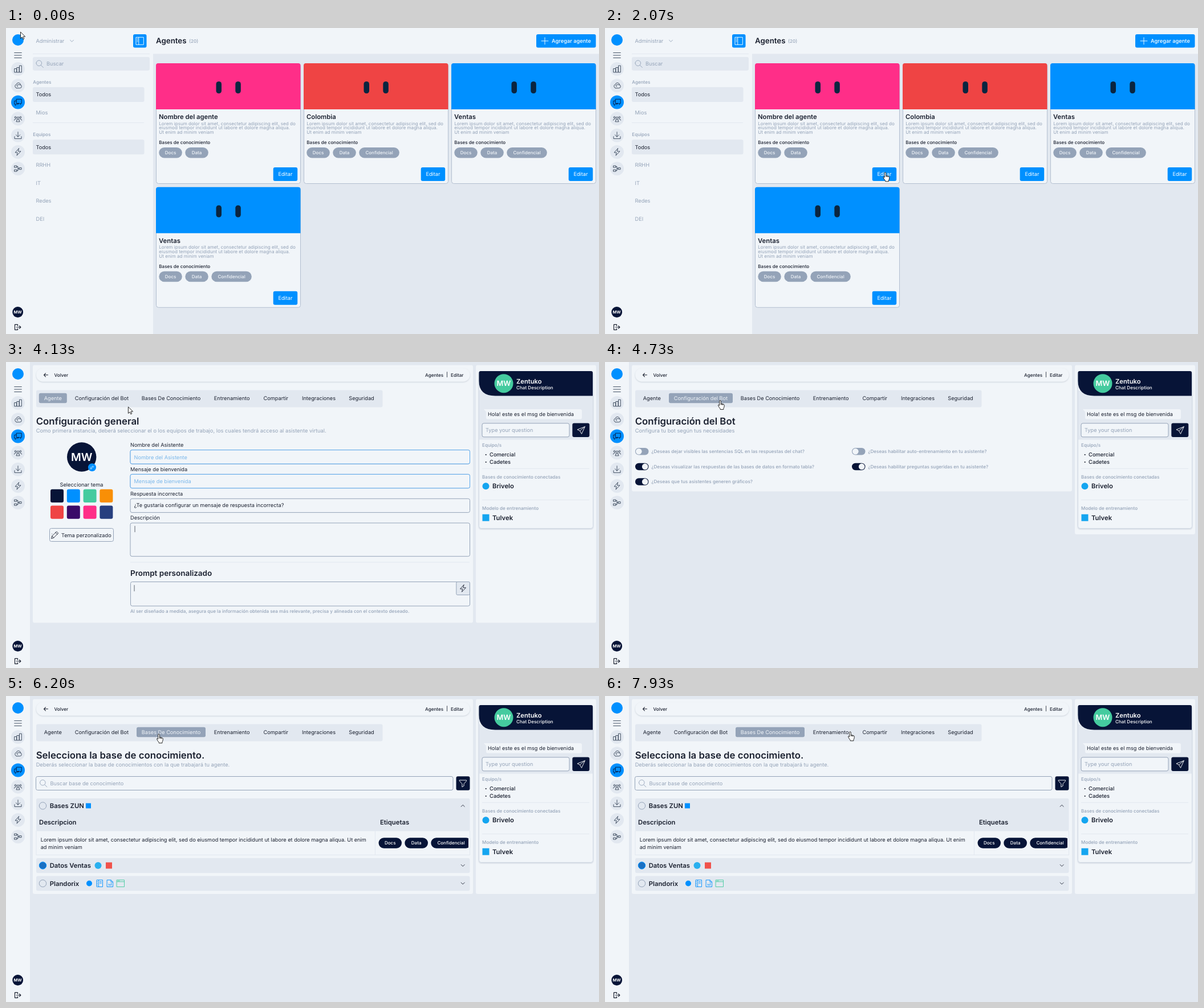
Animation of 1040x538 px, one loop 8000 ms. Source, as an HTML page:

```html
<!DOCTYPE html>
<html lang="es">
<head>
<meta charset="utf-8">
<title>Agentes</title>
<style>
  html, body { margin: 0; width: 100%; height: 100%; overflow: hidden; background: #e2e8f0; }
  svg { display: block; width: 1040px; height: 538px; }
  text { font-family: Inter, "Open Sans", sans-serif; text-rendering: geometricPrecision; }
</style>
</head>
<body>
<svg id="stage" viewBox="0 0 1040 538" xmlns="http://www.w3.org/2000/svg"></svg>
<script>
const LOOP = 8000;
const bg = '#e2e8f0', panel = '#f1f5f9', grey = '#94a3b8', ink = '#1b2130',
      navy = '#071437', blue = '#0090ff', white = '#fff', line = '#334155';

// Drawing helpers
const rect = (x, y, w, h, fill, r = 0, stroke = 'none', extra = '') =>
  `<rect x="${x}" y="${y}" width="${w}" height="${h}" rx="${r}" fill="${fill}" stroke="${stroke}" ${extra}/>`;
const circle = (x, y, r, fill, stroke = 'none') =>
  `<circle cx="${x}" cy="${y}" r="${r}" fill="${fill}" stroke="${stroke}"/>`;
// y is the middle of the capitals
const text = (s, x, y, size = 9.2, fill = ink, weight = 400, anchor = 'start') =>
  `<text x="${x}" y="${y + size * 0.36}" font-size="${size}" fill="${fill}" font-weight="${weight}" text-anchor="${anchor}">${s}</text>`;
const small = (s, x, y, fill = ink) => text(s, x, y, 8.1, fill, 500);
const title = (s, x, y, size = 11.3) => text(s, x, y, size, ink, 600);
const mid = (s, x, y, size, fill, weight = 400) => text(s, x, y, size, fill, weight, 'middle');
const rule = (x1, x2, y, color = bg) => `<path d="M${x1} ${y}H${x2}" stroke="${color}"/>`;
const icon = (name, x, y, color = line, k = 1, width = 0.9) =>
  `<path transform="translate(${x} ${y}) scale(${k})" d="${icons[name]}" fill="none" stroke="${color}" stroke-width="${width / k}" stroke-linejoin="round" stroke-linecap="round"/>`;
const pill = (s, x, y, w, fill, color) =>
  rect(x, y, w, 18.5, fill, 9.25) + mid(s, x + w / 2, y + 9.25, 8, color, 500);
const button = (s, x, y, w) => rect(x, y, w, 24, blue, 3) + mid(s, x + w / 2, y + 12, 9.2, white);
const box = (x, y, w, h, r = 3) => rect(x, y, w, h, panel, r, grey);

const icons = {
  menu: 'M-6.3-4.5H6.3M-6.3 0H6.3M-6.3 4.5H6.3',
  bars: 'M-6.3 5.5V-.5h3.8v6zM-2.1 5.5V-2.5H2.1v8zM2.5 5.5V-5.8H6.3V5.5z',
  cloud: 'M-2.5 4.5h5.8a3 3 0 0 0 0-6h-3.6a1.6 1.6 0 0 0 0 3.2M4.6-1.5a3.8 3.8 0 0 0-7.4-.6 3.4 3.4 0 0 0 .3 6.6',
  chat: 'M-2.5-5.2H6.2V2H4.8v2L2.4 2h-4.9zM-2.5-2.2H-6.2v5.6H-4.8v2.4L-2.2 3.4H1V2',
  people: 'M-1.8-1.5a1.8 1.8 0 1 0 3.6 0a1.8 1.8 0 1 0-3.6 0M-3 4.8a3 3.4 0 0 1 6 0zM-5.8-2.6a1.4 1.4 0 1 0 2.8 0a1.4 1.4 0 1 0-2.8 0M-6.5 2.6a2.3 2.6 0 0 1 3.6-2M3-2.6a1.4 1.4 0 1 0 2.8 0a1.4 1.4 0 1 0-2.8 0M6.5 2.6a2.3 2.6 0 0 0-3.6-2',
  download: 'M0-6V2.5M-3.6-1L0 2.6 3.6-1M-6 2v3.8H6V2',
  bolt: 'M1.4-6.2L-5 1h4.2l-1.2 5.2L5-1.2H.6z',
  nodes: 'M-6-5h4v3h-4zM-6 2h4v3h-4zM2.4-1.5H6v3H2.4zM-2-3.5H0v7H-2M0 0H2.4',
  exit: 'M0-4.6H-5v9.2H0V2.6M0-4.6v2M-2 0H5.4M3-2.4L5.4 0 3 2.4',
  search: 'M-6-1a4.8 4.8 0 1 0 9.6 0a4.8 4.8 0 1 0-9.6 0M2.2 2.6L6.4 6.6',
  sidebar: 'M-6.5-6.5h13v13h-13zM-2-6.5v13M-4.9-4h1.4M-4.9-1.5h1.4M-4.9 1h1.4',
  plus: 'M-6 0H6M0-6V6',
  down: 'M-3-1.5L0 1.5 3-1.5',
  up: 'M-3 1.5L0-1.5 3 1.5',
  back: 'M3.5 0H-3.5M-.6-3L-3.5 0-.6 3',
  pencil: 'M-6 6l1-4L3-6 6-3-2 5zM1.2-4.2l3 3M-5-1.8v0M-5 2l3 3',
  send: 'M6.5-6L-6.5-1-2 1.3.8 6.3zM-2 1.3L6.5-6',
  filter: 'M-6-5.5H6V-4L1.6 1v3.5l-3.2 2V1L-6-4z',
  book: 'M-5-6H5V6H-5zM-2-6V6M0-3H3M0-.5H3M-5-3h1M-5 0h1M-5 3h1',
  sheet: 'M-5-6H1.5L5-2.5V6H-5zM1.5-6v3.5H5M-2 3.5V1M0 3.5V2M2 3.5V-.5',
  window: 'M-6.5-6h13V6h-13zM-6.5-3h13M-5-4.5h1M-3-4.5h1'
};

const sidebar = () => {
  const items = ['bars', 'cloud', 'chat', 'people', 'download', 'bolt', 'nodes'];
  return rect(0, 0, 42, 538, panel) + circle(21, 21, 10, blue) + icon('menu', 21, 48) +
    items.map((name, i) => {
      const y = 72 + i * 29.2;
      return circle(21, y, 12, name === 'chat' ? blue : bg) + icon(name, 21, y, name === 'chat' ? navy : line);
    }).join('') +
    circle(20.7, 499.5, 9.4, navy) + mid('MW', 20.7, 499.5, 7.2, white, 700) +
    icon('exit', 20.5, 526, ink, 1, 1.2);
};

function card(x, y, name, color, tags) {
  const lines = ['Lorem ipsum dolor sit amet, consectetur adipiscing elit, sed do',
    'eiusmod tempor incididunt ut labore et dolore magna aliqua.', 'Ut enim ad minim veniam'];
  return rect(x + .5, y + .5, 253, 211, panel, 4, '#b3bfd0') +
    `<path d="M${x} ${y + 81}v-77q0-4 4-4h245.5q4 0 4 4v77z" fill="${color}"/>` +
    [105.5, 139.3].map(dx => rect(x + dx, y + 32, 9.5, 21, '#0a2540', 4.5)).join('') +
    title(name, x + 5, y + 94.2) +
    lines.map((s, i) => text(s, x + 5.3, y + 105.7 + i * 7.6, 8.1, grey)).join('') +
    small('Bases de conocimiento', x + 5.3, y + 139.2) +
    tags.map((s, i) => pill(s, x + 5.3 + i * 46, y + 148, i < 2 ? 40.5 : 70.5, grey, panel)).join('') +
    button('Editar', x + 205.7, y + 183, 42.5);
}

function agentList() {
  const two = ['Docs', 'Data'], three = [...two, 'Confidencial'];
  const row = (s, y, on) =>
    (on ? rect(47, y - 13, 195.5, 26, bg, 3) : '') + text(s, 52.5, y, 9.2, on ? ink : grey);
  return rect(42, 0, 216, 538, panel) + rect(42, 0, 998, 45.5, panel) +
    text('Administrar', 52.5, 22.7, 9.2, grey) + icon('down', 115.5, 22.7, grey) +
    rect(223, 11, 23.5, 23.5, blue, 3) + icon('sidebar', 234.8, 22.8, white) +
    rule(47, 252, 45.5) +
    rect(47, 51, 205, 23.7, bg, 3) + icon('search', 59, 62.8, grey) + text('Buscar', 71, 63, 9.2, grey) +
    small('Agentes', 47.3, 95, grey) + row('Todos', 117, 1) + row('Mios', 148.7) +
    rule(47, 242, 166.5) +
    small('Equipos', 47.3, 187, grey) + row('Todos', 209.2, 1) +
    ['RRHH', 'IT', 'Redes', 'DEI'].map((s, i) => row(s, 240.7 + i * 31.5)).join('') +
    title('Agentes', 263, 22.7, 13.3) + small('(20)', 321, 22.7, grey) +
    rect(930, 11, 104.5, 23.5, blue, 3) + icon('plus', 945, 22.8, white) +
    text('Agregar agente', 957, 22.8, 9.3, white, 500) +
    card(263, 62, 'Nombre del agente', '#ff2e88', two) + card(522, 62, 'Colombia', '#ef4444', three) +
    card(781, 62, 'Ventas', blue, three) + card(263, 279.8, 'Ventas', blue, three);
}

function preview() {
  const mark = (s, y, shape) => shape + title(s, 853, y);
  return rect(829.5, 16.5, 200, 276, panel, 4, '#d3dbe6', 'filter="url(#soft)"') +
    rect(830, 50, 199, 86.5, bg) +
    `<path d="M829.5 19q0-3 3-3h193.500q3 0 3 3v40.500h-171q-28.500 0-28.500-26z" fill="${navy}"/>` +
    circle(873, 37.7, 16.5, '#45cb9f') + mid('MW', 873, 37.7, 12.8, white, 600) +
    text('Zentuko', 895, 34, 11.2, white, 600) + small('Chat Description', 895, 45.3, white) +
    `<path d="M838 83h169q3 0 3 3v11.500q0 3-3 3h-162q-3 0-3-3v-10z" fill="${panel}"/>` +
    text('Hola! este es el msg de bienvenida', 845, 91.7) +
    box(835, 107.8, 153, 24) + text('Type your question', 841, 120, 9.2, grey) +
    rect(993.3, 107.5, 30, 24.5, navy, 3) + icon('send', 1008.5, 119.8, white) +
    small('Equipo/s', 835, 146.5, grey) +
    ['Comercial', 'Cadetes'].map((s, i) =>
      circle(841.7, 163 + i * 13, 1.1, ink) + text(s, 848, 162.3 + i * 13, 9.4, ink, 500)).join('') +
    rule(835, 1023, 187.3) + small('Bases de conocimiento conectadas', 835, 201.8, grey) +
    mark('Brivelo', 218.3, circle(841.5, 218.3, 6, '#14a5f0')) +
    rule(835, 1023, 242.5) + small('Modelo de entrenamiento', 835, 257, grey) +
    mark('Tulvek', 273.7, rect(835.5, 267.7, 12, 12, '#14a5f0'));
}

// Shared frame of the three settings pages
function settings(active, mainBottom, sideBottom, body) {
  const tabs = [['Agente', 82.3, 49], ['Configuración del Bot', 168, 112], ['Bases De Conocimiento', 289.5, 121],
    ['Entrenamiento', 396.2], ['Compartir', 473.3], ['Integraciones', 548.5], ['Seguridad', 623.5]];
  return rect(47, 5.5, 772, mainBottom - 5.5, panel, 3) + rect(824, 5.5, 211, sideBottom - 5.5, panel, 3) +
    rect(53, 11, 760.5, 23.5, panel, 11.7, 'none', 'filter="url(#soft)"') +
    icon('back', 70, 22.8, ink, 1, 1.1) + small('Volver', 84.5, 22.8) +
    small('Agentes', 735, 22.8) + small('|', 772, 22.3) + small('Editar', 780, 22.8) +
    rect(53, 49.5, 607.5, 30, bg, 3) +
    tabs.map(([s, x, w], i) => (i === active ? rect(x - w / 2, 54.7, w, 17.5, grey, 3) : '') +
      mid(s, x, 63.6, 9.2, i === active ? panel : ink)).join('') + preview() + body;
}
const heading = (s, sub) => title(s, 52.7, 104.3, 16.8) + text(sub, 52.7, 120.7, 9.25, grey);

function agentPage() {
  const colors = [navy, blue, '#45cb9f', '#f98f06', '#ef4444', '#3a0a68', '#ff2e88', '#273f7f'];
  return settings(0, 458.5, 458.5,
    heading('Configuración general', 'Como primera instancia, deberá seleccionar el o los equipos de trabajo, los cuales tendrá acceso al asistente virtual.') +
    circle(132.7, 167, 25.7, navy) + mid('MW', 132.7, 167, 19.3, white, 600) +
    circle(151, 185.3, 7, blue) + icon('pencil', 151, 185.3, white, .45, .6) +
    mid('Seleccionar tema', 132.5, 215.6, 9.3, ink) +
    colors.map((c, i) => rect(78 + i % 4 * 28.8, 223.7 + (i > 3) * 28.8, 23, 23.3, c, 3)).join('') +
    box(76.5, 292.5, 112, 23) + icon('pencil', 85.7, 304, ink) + text('Tema perzonalizado', 97, 304.2) +
    text('Nombre del Asistente', 218, 145.8) + box(218, 154.7, 595.5, 24.5) +
    text('Mensaje de bienvenida', 218, 188.5) + box(218, 197.4, 595.5, 24.3) +
    text('Nombre del Asistente', 224.5, 167.3, 9.2, grey) + text('Mensaje de bienvenida', 224.5, 209.3, 9.2, grey) +
    ['Nombre del Asistente', 'Mensaje de bienvenida'].map((s, i) => `<g class="glow" opacity="0">` +
      rect(218, 154.7 + i * 42.7, 595.5, 24.4, panel, 3, '#5aa9ee') +
      text(s, 224.5, 167.3 + i * 42, 9.2, '#7ab7ea') + '</g>').join('') +
    text('Respuesta incorrecta', 218, 231.3) + box(218, 240.3, 595.5, 24.3) +
    text('¿Te gustaría configurar un mensaje de respuesta incorrecta?', 224.5, 252) +
    text('Descripción', 218, 274) + box(218, 283, 595.5, 58.7) + text('|', 224.5, 294) +
    rule(218, 813, 352) + title('Prompt personalizado', 218, 371.5, 13.5) +
    box(218.5, 386.5, 595, 42.5) + text('|', 223.5, 397.5) +
    rect(789.8, 386.5, 23.5, 23, bg, 2, grey) + icon('bolt', 801.5, 398, ink) +
    small('Al ser diseñado a medida, asegura que la información obtenida sea más relevante, precisa y alineada con el contexto deseado.', 218, 438.5, grey));
}

function botPage() {
  const toggle = (s, x, y, on) => rect(x, y - 6, 23.5, 12.5, on ? navy : grey, 6.2) +
    circle(x + (on ? 17.2 : 6.3), y + .2, 5.3, panel) + small(s, x + 28.2, y, grey);
  return settings(1, 227.5, 303,
    heading('Configuración del Bot', 'Configura tu bot según tus necesidades') +
    toggle('¿Deseas dejar visibles las sentencias SQL en las respuestas del chat?', 53, 157) +
    toggle('¿Deseas visualizar las respuestas de las bases de datos en formato tabla?', 53, 183.7, 1) +
    toggle('¿Deseas que tus asistentes generen gráficos?', 53, 210.2, 1) +
    toggle('¿Deseas habilitar auto-entrenamiento en tu asistente?', 433, 157) +
    toggle('¿Deseas habilitar preguntas sugeridas en tu asistente?', 433, 183.7, 1));
}

function basesPage() {
  const row = (s, y, h, chevron, on) => rect(53, y - 13, 760.5, h, bg, 3) +
    circle(64.5, y, 6.2, on ? '#1a70c2' : 'none', on ? blue : grey) +
    title(s, 76.7, y) + icon(chevron, 801.2, y, ink);
  return settings(2, 348, 348,
    heading('Selecciona la base de conocimiento.', 'Deberás seleccionar la base de conocimientos con la que trabajará tu agente.') +
    box(52.5, 141.5, 731.5, 24) + icon('search', 65.5, 153.3, grey) +
    text('Buscar base de conocimiento', 77.5, 153.7, 9.2, grey) +
    rect(789.5, 141.3, 24, 24.4, navy, 3) + icon('filter', 801.5, 153.5, white) +
    row('Bases ZUN', 193, 57, 'up') + rect(140, 188.5, 9, 9, blue) +
    title('Descripcion', 58, 222) + title('Etiquetas', 656, 222) +
    rect(53, 237, 760.5, 42.5, panel, 0, bg) + `<path d="M647.500 237v42" stroke="${bg}"/>` +
    text('Lorem ipsum dolor sit amet, consectetur adipiscing elit, sed do eiusmod tempor incididunt ut labore et dolore magna aliqua. Ut enim', 60.7, 252.3) +
    text('ad minim veniam', 60.7, 265.5) +
    '<g clip-path="url(#cell)">' + pill('Docs', 653.5, 249.2, 40.5, navy, white) +
    pill('Data', 699.3, 249.2, 40.7, navy, white) + pill('Confidencial', 745.3, 249.2, 70.5, navy, white) + '</g>' +
    row('Datos Ventas', 298, 26.3, 'down', 1) + circle(161.5, 298, 6, '#29b0ef') + rect(175, 292.5, 11, 11, '#f0524b') +
    row('Plandorix', 329.5, 26, 'down') + circle(146, 329.5, 5, blue) +
    icon('book', 164.5, 329.5, blue) + icon('sheet', 182.5, 329.5, blue) + icon('window', 201, 329.5, '#45cb9f'));
}

const pages = [[0, agentList], [2600, agentPage], [4670, botPage], [6200, basesPage]];
const stage = document.getElementById('stage');
stage.innerHTML = `<defs>
  <filter id="soft" x="-5%" y="-20%" width="110%" height="150%"><feDropShadow dx="0" dy="1" stdDeviation="1" flood-color="#64748b" flood-opacity=".3"/></filter>
  <clipPath id="cell"><rect x="650" y="240" width="161" height="38"/></clipPath></defs>` +
  rect(0, 0, 1040, 538, bg) + pages.map(([, draw]) => `<g class="page">${draw()}</g>`).join('') + sidebar() +
  `<g id="cursor" fill="#fff" stroke="#111" stroke-width=".9" stroke-linejoin="round">
    <path id="arrow" d="M0 0v11.400l2.700-2.500 1.700 3.900 1.900-.8-1.700-3.900h3.600z"/>
    <path id="hand" d="M-1.300 1.200a1.300 1.300 0 0 1 2.600 0V5.600l1.800.2 1.800.5 1.600.6q.9.500.8 2.300l-.5 3-.9 1.700v1.900h-5.700v-1.300l-2-2.600-1.700-3.300q0-1.300 1.200-.9l1 1.200zM1.300 5.600v2.200M3.100 5.800v2.200M4.900 6.300v2"/>
  </g>`;

// Pointer tip: time, x, y
const track = [[0, 25.5, 7], [130, 27.5, 7.5], [430, 27.5, 7.5], [1270, 375, 128], [1940, 491.5, 254],
  [3490, 491.5, 254], [4130, 214.5, 79], [4400, 198.5, 67.5], [4620, 198.5, 67.5], [5130, 238, 69],
  [5470, 260.5, 67.5], [5680, 268, 67], [6560, 268, 67], [7270, 390, 62], [7690, 390, 62], [7930, 430, 63]];

const secant = (i, c) => track[i + 1] && track[i] ? (track[i + 1][c] - track[i][c]) / (track[i + 1][0] - track[i][0]) : 0;
function slope(i, c) {
  const a = secant(i - 1, c), b = secant(i, c);
  return a * b > 0 ? 2 * a * b / (a + b) : 0;
}
// Monotone cubic through the track
function at(t, c) {
  const i = track.findIndex((p, k) => !track[k + 1] || t < track[k + 1][0]);
  if (!track[i + 1]) return track[i][c];
  const [p, q] = [track[i], track[i + 1]], d = q[0] - p[0], u = (t - p[0]) / d, v = 1 - u;
  return v * v * (1 + 2 * u) * p[c] + u * u * (3 - 2 * u) * q[c] +
    d * u * v * (v * slope(i, c) - u * slope(i + 1, c));
}

const clamp = n => Math.max(0, Math.min(1, n));
const groups = [...stage.querySelectorAll('.page')], glows = [...stage.querySelectorAll('.glow')];
const [cursor, arrow, hand] = ['cursor', 'arrow', 'hand'].map(id => document.getElementById(id));
const show = (el, on) => { el.style.display = on ? '' : 'none'; };

function render(t) {
  const current = pages.filter(([from]) => t >= from).length - 1;
  groups.forEach((g, i) => show(g, i === current));
  const pointing = (t >= 2070 && t < 2600) || t >= 4270;
  show(hand, pointing);
  show(arrow, !pointing);
  cursor.setAttribute('transform', `translate(${at(t, 1).toFixed(2)} ${at(t, 2).toFixed(2)})`);
  glows.forEach((g, i) => {
    const start = i ? 3700 : 3820;
    g.setAttribute('opacity', Math.min(clamp((t - start) / 200), clamp((4470 - t) / 200)));
  });
}

const begin = performance.now();
function tick() {
  render((performance.now() - begin) % LOOP);
  requestAnimationFrame(tick);
}
tick();
</script>
</body>
</html>
```
